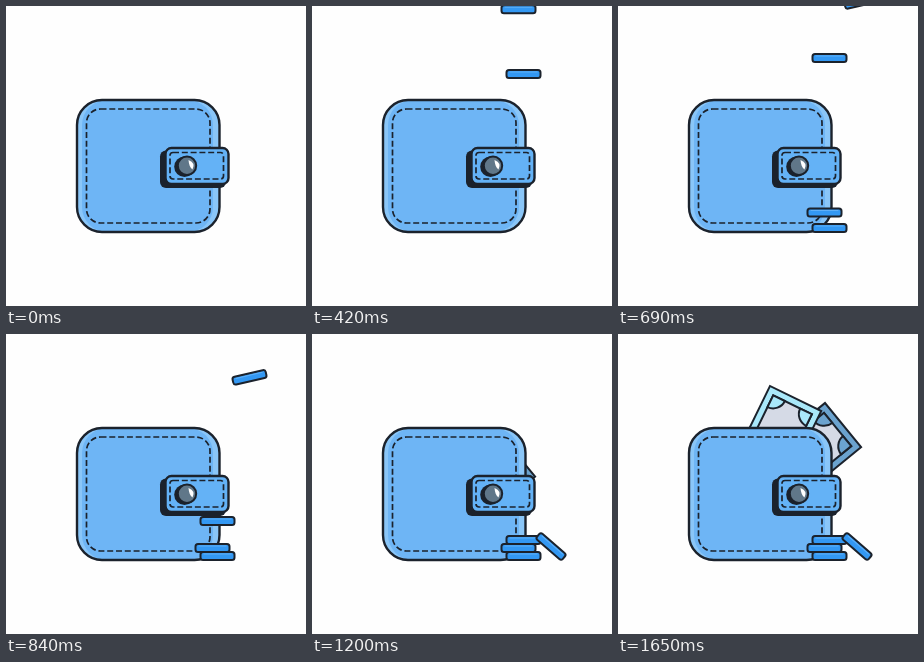
An HTML page with a canvas that plays this animation: 300 px wide and 300 px high, repeating every 3570 ms.

```html
<!DOCTYPE html>
<html lang="en">
<head>
<meta charset="utf-8">
<title>Wallet</title>
<style>
html, body { margin: 0; width: 100%; height: 100%; overflow: hidden; background: #fefefe; }
canvas { display: block; width: 100%; height: 100%; }
</style>
</head>
<body>
<canvas id="stage" width="300" height="300"></canvas>
<script>
const LOOP = 3570, STEP = 30, TOP = -5;
const INK = '#1b222c', BLUE = '#6eb5f5', RIM = '#8ac6f8', FLAP = '#64b2f6';
const ctx = document.getElementById('stage').getContext('2d');

const progress = (t, start, duration) => Math.min(1, Math.max(0, (t - start) / duration));
const mix = (a, b, p) => a + (b - a) * p;

function paint(path, fill, lineWidth = 2) {
  if (fill) {
    ctx.fillStyle = fill;
    ctx.fill(path);
  }
  if (lineWidth) {
    ctx.strokeStyle = INK;
    ctx.lineWidth = lineWidth;
    ctx.stroke(path);
  }
}

function box(x, y, width, height, radius) {
  const path = new Path2D();
  path.roundRect(x, y, width, height, radius);
  return path;
}

function disc(x, y, radius) {
  const path = new Path2D();
  path.arc(x, y, radius, 0, 2 * Math.PI);
  return path;
}

function stitch(path) {
  ctx.setLineDash([6, 2.8]);
  paint(path, null, 1.7);
  ctx.setLineDash([]);
}

function placed(x, y, degrees, drawShape) {
  ctx.save();
  ctx.translate(x, y);
  ctx.rotate(degrees * Math.PI / 180);
  drawShape();
  ctx.restore();
}

const body = box(71, 94, 142.5, 132, 25);
const bodyFront = box(76, 94, 131, 132, 25);
const flap = box(159.5, 142, 63, 36, 6);
const shine = new Path2D('M182.5 154Q190 157 186.5 163.5Q183 161 182.5 154Z');
const billCorners = new Path2D('M7 7H20A13 13 0 0 1 7 20ZM50 7V20A13 13 0 0 1 37 7Z');

function drawWallet() {
  paint(body, RIM, 0);
  paint(bodyFront, BLUE, 0);
  paint(body, null, 2.4);
  stitch(box(80.5, 103, 123.5, 114, 14));

  paint(box(154, 144.5, 66, 37.5, 6), INK, 0);
  paint(flap, FLAP, 2.4);
  stitch(box(164, 146.5, 53.5, 26.5, 3));
  paint(disc(178.5, 160.8, 10.3), INK, 0);
  paint(disc(181, 159.7, 9.2), '#607789');
  paint(shine, '#fff', 0);
}

function drawBill(t, start, color, x, y, dx, dy, angle) {
  const rest = 1 - progress(t, start, 150);
  if (rest === 1) return;
  placed(x + dx * rest, y + dy * rest, angle, () => {
    paint(box(0, 0, 57, 90, 0), color);
    paint(box(7, 7, 43, 76, 0), '#d5dae6');
    paint(billCorners, color);
  });
}

function drawCoin(x, y, angle) {
  placed(x, y, angle, () => {
    paint(box(-17, -4, 34, 8, 2.5), '#3398f3');
    paint(box(-14, -2.5, 28, 1, 0.5), '#5fb0f8', 0);
  });
}

function dropCoin(t, x, y, start, duration) {
  const p = progress(t, start, duration);
  if (p > 0) drawCoin(x, mix(TOP, y, p * p), 0);
}

// The last coin falls slightly tilted, then tips over against the stack.
function dropTippingCoin(t) {
  const p = progress(t, 675, 350);
  const tip = progress(t, 960, 90);
  if (p > 0) drawCoin(mix(243.5, 239, tip), mix(TOP, 212.5, p * p), mix(-13, 41, tip));
}

function draw(elapsed) {
  const t = Math.floor((elapsed + 0.5) % LOOP / STEP) * STEP;
  ctx.fillStyle = '#fefefe';
  ctx.fillRect(0, 0, 300, 300);
  drawBill(t, 1170, '#6ba3cf', 207, 69, -25, 37, 50.7);
  drawBill(t, 1500, '#a9e8fa', 152, 52, -20, 50, 26);
  drawWallet();
  dropCoin(t, 211.5, 222, 189, 407);
  dropCoin(t, 206.5, 214, 353, 343);
  dropCoin(t, 211.5, 206, 510, 346);
  dropTippingCoin(t);
}

const begin = performance.now();
function frame() {
  draw(performance.now() - begin);
  requestAnimationFrame(frame);
}
frame();
</script>
</body>
</html>
```
